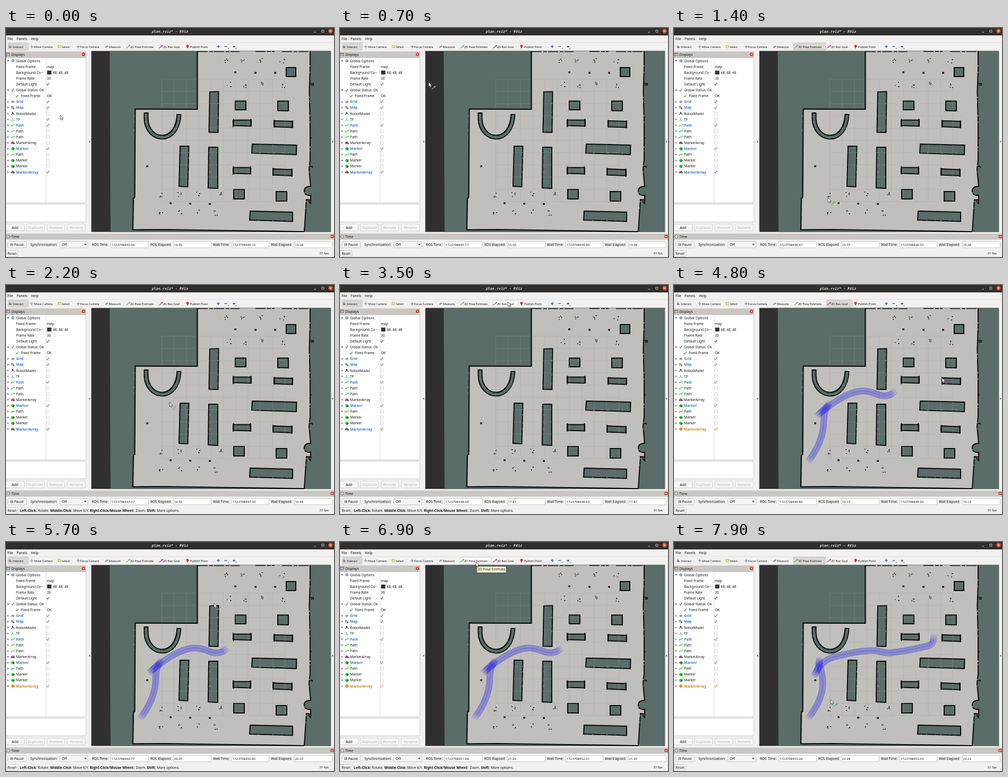
Write an HTML page that moves like this. It is 618 px wide and 434 px high and loops after 8 s.

```html
<!DOCTYPE html>
<html lang="en">
<head>
<meta charset="utf-8">
<title>plan.rviz* - RViz</title>
<style>
html, body { margin: 0; width: 100%; height: 100%; overflow: hidden; background: #f2f1f0; }
svg { display: block; width: 618px; height: 434px; font: 6.5px "Noto Sans", "Open Sans", sans-serif; fill: #141414; }
text { white-space: pre; }
.bar { font-size: 5.4px; }
.num { font-size: 6.15px; }
.b { font-weight: 700; }
.on { font-weight: 700; fill: #3d78c6; }
.warn { font-weight: 700; fill: #c98522; }
.off { fill: #bbb8b5; }
.wall { fill: none; stroke: #080808; stroke-width: 2.2; }
.box { fill: #5a6d68; stroke: #080808; stroke-width: 2; }
.foot path { fill: #2020f0; fill-opacity: .075; stroke: #1818d8; stroke-opacity: .15; stroke-width: .5; }
</style>
</head>
<body>
<svg id="stage" viewBox="0 0 618 434"></svg>
<script>
const stage = document.getElementById('stage');
const LOOP = 8000, STEP = 100;
const TEAL = '#5a6d68', FREE = '#c1bfbc', HEADER = '#c9c6c3';

const rect = (x, y, w, h, fill, extra = '') =>
  `<rect x="${x}" y="${y}" width="${w}" height="${h}" fill="${fill}" ${extra}/>`;
const text = (x, y, s, extra = '') => `<text x="${x}" y="${y}" ${extra}>${s}</text>`;
const line = (d, color, w = 1, extra = '') =>
  `<path d="${d}" fill="none" stroke="${color}" stroke-width="${w}" ${extra}/>`;
const shape = (d, fill, extra = '') => `<path d="${d}" fill="${fill}" ${extra}/>`;
const disc = (x, y, r, fill) => `<circle cx="${x}" cy="${y}" r="${r}" fill="${fill}"/>`;
const frame = (x, y, w, h, fill = '#fff', edge = '#c3bfbb') =>
  rect(x + .5, y + .5, w - 1, h - 1, fill, `rx="1.5" stroke="${edge}" stroke-width=".8"`);
const tick = (x, y, color = '#333', s = 1) =>
  line(`M${x - 2 * s} ${y}l${1.5 * s} ${1.8 * s}l${2.7 * s} ${-4 * s}`, color, s);

let seed = 11;
const rnd = () => (seed = seed * 16807 % 2147483647) / 2147483647;

function closeIcon(x, y) {
  return rect(x - 3, y - 3, 6, 6, '#d33a35', 'rx="1.5"') +
    line(`M${x - 1.3} ${y - 1.3}l2.6 2.6m0-2.6l-2.6 2.6`, '#fff', .9);
}

function titleAndMenu() {
  return rect(0, 0, 618, 14, '#302f2d') +
    text(309, 8.6, 'plan.rviz* - RViz', `text-anchor="middle" fill="#e4e0d8"
      style="font:italic bold 6.7px 'DejaVu Sans Mono',monospace"`) +
    line('M580 8h4M595 4h4v4h-4z', '#d6d2ca', .9) + disc(611.5, 5.8, 4.2, '#e3562b') +
    line('M610 4.3l3 3m0-3l-3 3', '#fff', .9) +
    text(3, 23, 'File') + text(20, 23, 'Panels') + text(47, 23, 'Help') +
    line('M0 27.5H618', '#dedbd8', .7);
}

const arrowIcon = (x, y, color) =>
  line(`M${x - 3.5} ${y + 2.8}l5-4`, color, 1.1) + shape(`M${x + 4} ${y - 3.3}l-1.2 3.4-2.3-2.6z`, color);

function toolbar() {
  const tools = [[13, 'Interact'], [53, 'Move Camera'], [105, 'Select'], [140, 'Focus Camera'],
    [194, 'Measure'], [234, '2D Pose Estimate'], [296, '2D Nav Goal'], [347, 'Publish Point']];
  return tools.map(([x, s]) => text(x, 37.7, s, 'class="bar"')).join('') +
    shape('M6 38l-1-3 1-.4.7 1V32h1.2v2.5l2.5.6v2.9z', '#7d8794') +
    line('M48.5 32v7M45 35.5h7', '#8b949c', 1.2) +
    rect(98, 33, 5, 4.5, '#f1e7a6', 'stroke="#b9a84c" stroke-width=".8"') +
    line('M136 32v7M132.5 35.5h7', '#8b949c', 1) + disc(136, 35.5, 1.4, '#8b949c') +
    line('M187 37l5-3', '#8c9099', 2.4) +
    arrowIcon(230, 35.5, '#35c93f') + arrowIcon(292, 35.5, '#b822a8') +
    shape('M342 39.3l-2.3-4a2.5 2.5 0 1 1 4.6 0z', '#cf3b2e') +
    line('M400 32.5v5.5M397.2 35.2h5.6M411.5 35.2h5', '#3f7ecb', 1.7) +
    shape('M417.5 38.5h3l-1.5 1.5zM432 38.5h3l-1.5 1.5z', '#555') +
    shape('M426.5 35.2q3.2-3.5 6.5 0q-3.3 3.2-6.5 0z', '#8d9bb0') + disc(429.7, 35.2, 1.3, '#2e4b78');
}

// icon, label, value ('1'/'0' = checkbox), optional id
const rows = [
  ['gear', 'Global Options'], ['', 'Fixed Frame', 'map'], ['', 'Background Co···', '48; 48; 48'],
  ['', 'Frame Rate', '30'], ['', 'Default Light', '1'], ['ok', 'Global Status: Ok'],
  ['sub', 'Fixed Frame', 'OK'], ['grid', 'Grid', '1'], ['map', 'Map', '1'], ['robot', 'RobotModel', '0'],
  ['tf', 'TF', '1', 'tf'], ['path', 'Path', '1'], ['path', 'Path', '0'], ['path', 'Path', '0'],
  ['array', 'MarkerArray', '0'], ['cube', 'Marker', '1'], ['path', 'Path', '0'],
  ['cube', 'Marker', '0'], ['cube', 'Marker', '0'], ['array', 'MarkerArray', '1', 'arr']
];
const rowY = i => 62.2 + i * 11.1;

const icons = {
  gear: y => disc(13, y, 2.7, '#5b8fc7') + disc(13, y, 1, '#dfeaf5'),
  ok: y => tick(12.5, y, '#2e9a35', 1.15),
  sub: y => tick(21, y, '#2e9a35', 1.15),
  grid: y => shape(`M9.5 ${y}l3.5-2.5 3.5 2.5-3.5 2.5z`, '#8f9396'),
  map: y => rect(10, y - 2.7, 5.5, 5.4, '#c9ccca') + shape(`M10 ${y - 2.7}h2.5v2.7h-2.5zM13 ${y}h2.500v2.700h-2.500z`, '#6f7673'),
  robot: y => disc(12.5, y - 1.5, 1.5, '#444') + line(`M10 ${y + 2.5}l2-2.5h2l2 2.5`, '#555', 1.2),
  tf: y => line(`M12.5 ${y + 1}v-4m0 4l-3 1.5`, '#3c9d55', .9) + line(`M12.5 ${y + 1}l3.5 1.5`, '#5689c4', .9),
  path: y => line(`M9.5 ${y + 2.3}c2-5 4 0 7-4.3`, '#2fd43a', 1.4),
  cube: y => shape(`M13 ${y - 3}l3 1.5v3l-3 1.7-3-1.7v-3z`, '#25c52c') + shape(`M13 ${y}l3-1.5v3l-3 1.7z`, '#12801a'),
  array: y => disc(13, y - 1.2, 1.7, '#2ca53a') + disc(11.2, y + .5, 1.9, '#cc3a30') + disc(14.7, y + .8, 1.9, '#3a62c9')
};

function tree() {
  let out = '';
  rows.forEach(([icon, label, value, id], i) => {
    const y = rowY(i), open = i === 0 || i === 5, check = value === '1' || value === '0';
    if (open) out += shape(`M2 ${y - 1}h4l-2 2.5z`, '#444');
    else if (i > 6) out += shape(`M2.8 ${y - 2}v4l2.5-2z`, '#666');
    if (icon) out += `<g ${id ? `id="${id}Icon"` : ''}>${icons[icon](y)}</g>`;
    const cls = i > 6 && value === '1' ? 'class="on"' : '';
    out += text(icon === 'sub' ? 28 : 19, y + 2.4, label, cls + (id ? ` id="${id}Label"` : ''));
    if (check) {
      out += frame(76, y - 3.2, 6.4, 6.4, '#fff', '#cbc8c5');
      if (value === '1') out += `<g ${id ? `id="${id}Tick"` : ''}>${tick(78.8, y, i > 6 ? '#3b628b' : '#222')}</g>`;
    } else if (value) {
      const swatch = value.includes(';');
      if (swatch) out += rect(77.5, y - 3.7, 8, 7.4, '#303030');
      out += text(swatch ? 88 : 77, y + 2.4, value);
    }
  });
  return out;
}

function displays() {
  const button = (x, w, s, cls = '') =>
    frame(x, 371, w, 14, '#f6f5f4', '#cfccc9') + text(x + w / 2, 380.6, s, `text-anchor="middle" ${cls}`);
  return rect(0, 44.5, 151, 11.5, HEADER) + line('M1 47.5h6v5h-6zM1 49h6', '#666', .8) +
    text(10, 52.5, 'Displays') + closeIcon(146, 50) +
    frame(-1, 56, 152, 276) + line('M75.5 57V331', '#dddbd9', .8) + tree() +
    frame(-1, 333.5, 152, 34.5) +
    button(-1, 36, 'Add') + button(38, 35, 'Duplicate', 'class="off"') +
    button(77, 34, 'Remove', 'class="off"') + button(115, 35, 'Rename', 'class="off"');
}

const cluster = (x, y) => {
  let d = '';
  for (let i = 0; i < 4; i++) d += `M${x + rnd() * 9 - 4} ${y + rnd() * 10 - 5}h${1 + rnd() * 1.2}v1.7h-1.5z`;
  return shape(d, '#111');
};

function map() {
  const shelves = ['384 121L400.5 120.5L399.5 198L382.5 197.5', '432 138.5L452 138.5L452 155L432 155',
    '512 138.5L532 138.5L532 157L512 156.5', '428 174.5L462 174.5L462 186L428 185',
    '505 176L540 177L540 188.5L505 187', '464 220L547.5 222L547 240L463 237',
    '328 224L344.5 224L342.5 301L326 300', '382 226L399 226L399 304L381 303',
    '428 264.5L461 264.5L461 276.5L428 275.5', '503 267L539 268.5L539 280L503 278.5',
    '429 306L449 306L449 324L429 324', '509 310L529 310L529 328L509 328',
    '460 347L540 349L540 366.5L459 364', '528 75L546 75L546 92L528 92'];
  const rim = 'M360.5 44V154L243.5 153.5L242.5 321L240 323L239 382.5L300 382L430 384L561 386';
  const right = 'M573 44V78L571.5 120L573 180V250L571 268L574 300C565 300 562 304 562 309C562 316 568 318 574 317V326L566 325L562 386';
  const floor = rim + 'L562 386L566 325L574 326V317C568 318 562 316 562 309C562 304 565 300 574 300L571 268L573 250V180L571.5 120L573 78V44Z';
  const cup = 'C265.5 217 323.5 223 326';
  let grid = '';
  for (let i = 0; i <= 10; i++) {
    const k = i * 23.2;
    grid += `M${293.5 + k} 97V329M293.5 ${97 + k}H525.5`;
  }
  let out = rect(160.7, 43.5, 451.5, 343, '#303030') + shape('M195.5 43.5H612.2V386.5H197z', TEAL) +
    shape(floor, FREE) +
    shelves.map(p => `<path class="box" d="M${p}Z"/>`).join('') +
    line(`M264 160V172${cup} 163`, '#080808', 9) +
    line(`M264 162V172${cup} 165`, TEAL, 5) +
    line(grid, '#a0a0a4', .7, 'opacity=".42"');
  // thick shelf ends
  out += line('M428.5 172v16M461.5 172v15M505.5 174v15M539.5 175v15M428.5 262v16M460.5 262v16M503.5 265v15M538.5 266v16', '#080808', 1.8);
  out += `<path class="wall" d="${rim}"/>` +
    line(right, '#080808', 2, 'stroke-dasharray="27 1.5 11 1 46 2 5 1"') +
    line('M361 44.8H440M470 44.5H506M520 44.8H573', '#111', 1.3, 'stroke-dasharray="19 3 7 2"') +
    line('M572 105h7v3h-5M573 208h3M573 262h4v3M570 328l4 5v-10', '#080808', 1.5) +
    line('M241.5 205L242 160M399 132V192M384 235V298M467 237H543M465 365H530M344 235V296M262 167l1 12', '#e2e1df', .7, 'stroke-dasharray="1 9 2 15"');
  for (const [y, xs] of [[61, [416, 445, 481, 519]], [107, [418, 447, 484, 519]],
    [315, [292, 325, 363, 404]], [349, [291, 326, 360, 393]]])
    out += xs.map(x => cluster(x, y)).join('');
  for (const [x, y] of [[432, 84], [470, 85], [507, 85], [310, 332], [347, 333], [384, 333.5], [266, 262]])
    out += rect(x - 1.7, y - 1.6, 3.6, 3.2, '#080808');
  return out;
}

function timePanel() {
  const fields = [[162, 197, 72, 'ROS Time:'], [272, 315, 72, 'ROS Elapsed:'],
    [390, 425, 71, 'Wall Time:'], [499, 543, 72, 'Wall Elapsed:']];
  return rect(0, 389.5, 618, 11.5, HEADER) +
    '<circle cx="4.5" cy="395.3" r="2.7" fill="#fff" stroke="#555" stroke-width=".9"/>' +
    text(10, 397.8, 'Time') + closeIcon(614.5, 395) +
    frame(3, 404, 36, 13, '#f6f5f4') + line('M9.5 408v5M12.5 408v5', '#444', 1.3) + text(15.2, 412.8, 'Pause') +
    text(46, 412.8, 'Synchronization:') + frame(101, 404, 54, 13, '#f6f5f4') + text(105, 412.8, 'Off') +
    shape('M147 409h5l-2.5 3z', '#555') +
    fields.map(([x, fx, w, s], i) => text(x, 412.8, s) + frame(fx, 404, w, 13) +
      text(fx + 1.6, 412.7, '', `id="clock${i}" class="num"`)).join('') +
    frame(0, 421, 23, 13, '#f6f5f4') + text(3, 430, 'Reset') + text(590.5, 428.6, '31 fps', 'class="num"') +
    `<text id="hint" x="26" y="429.8"><tspan class="b">Left-Click:</tspan> Rotate. <tspan class="b">Middle-Click:</tspan> Move X/Y. <tspan class="b">Right-Click/Mouse Wheel:</tspan>: Zoom. <tspan class="b">Shift:</tspan> More options.</text>`;
}

// footprints swept along a route with one reversal
function footprints(d) {
  const p = document.createElementNS('http://www.w3.org/2000/svg', 'path');
  p.setAttribute('d', d);
  const len = p.getTotalLength();
  let out = '';
  for (let s = 0; s <= len; s += 3) {
    const c = p.getPointAtLength(s);
    const a = p.getPointAtLength(Math.max(0, s - .5)), b = p.getPointAtLength(Math.min(len, s + .5));
    const deg = Math.atan2(b.y - a.y, b.x - a.x) * 180 / Math.PI;
    out += `<path d="M-6-5.7h12v11.4h-12zM-6 0h12" transform="translate(${c.x} ${c.y}) rotate(${deg})"/>`;
  }
  return out;
}
const routes = [
  'M256 330C272 308 281 285 282 262S284 240 291 227L273 245C300 222 330 201 357 201C376 202 384 210 396 210C404 210 409 207 415 203',
  'M256 330C272 308 282 285 280 262S274 240 274 225Q272 240 266 250C275 233 285 222 305 217C330 211 355 205 378 206C395 208 400 212 415 209C440 206 465 200 478 197C486 195 489 190 489 180'
];

stage.innerHTML = rect(0, 0, 618, 434, '#f2f1f0') + titleAndMenu() +
  `<g id="hover">${frame(0, 28.5, 61, 13.5, '#fbfbfa', '#c9c6c3')}</g>` +
  '<rect id="active" y="28.5" height="13.5" rx="1.5" fill="#d9d7d4" stroke="#bdbab6" stroke-width=".7"/>' +
  toolbar() + displays() + map() +
  routes.map((d, i) => `<g id="route${i}" class="foot">${footprints(d)}</g>`).join('') +
  shape('M158.3 213.5v4l-2.2-2zM614.5 213.5v4l2.2-2z', '#555') + timePanel() +
  `<g id="tip">${rect(257.5, 46, 56, 12.3, '#ffffdc', 'stroke="#222" stroke-width=".8"')}${text(259, 54.3, '2D Pose Estimate')}</g>` +
  `<g id="cursor"><g id="toolMark">${line('M6 13l5-4', 'currentColor', 1.2)}${shape('M13.5 6.5l-1.5 4-2.5-2.8z', 'currentColor')}</g>
   ${shape('M0 0V8.5L2 6.7 3.4 9.7 4.9 9 3.5 6.2H6.2Z', '#fff', 'stroke="#222" stroke-width=".7"')}</g>`;

const el = id => document.getElementById(id);
const show = (id, on) => { el(id).style.display = on ? '' : 'none'; };

const trail = [[0, 102, 165], [300, 78, 171], [500, 78, 171], [900, 256, 35], [1000, 256, 35],
  [1400, 290, 322], [1650, 256, 331], [1900, 262, 318], [2200, 308, 222], [3300, 312, 37],
  [3500, 316, 32], [3700, 316, 32], [4800, 505, 176], [5100, 488, 181], [5300, 489, 172],
  [6200, 256, 38], [7300, 256, 38], [7900, 295, 299]];
const clockTimes = [0, 1400, 2200, 3500, 4800, 6900, 7900];
const clocks = [
  [45.06, 46.47, 47.27, 48.58, 49.86, 51.98, 53.00], [14.35, 15.75, 16.56, 17.87, 19.15, 21.26, 22.28],
  [45.10, 46.50, 47.30, 48.62, 49.90, 52.01, 53.03], [14.28, 15.69, 16.46, 17.87, 19.15, 21.20, 22.22]
];
const modes = [[0, 'interact'], [1000, 'pose'], [1900, 'interact'], [3700, 'goal'], [5300, 'interact'], [7300, 'pose']];
const spans = { interact: [4, 38], pose: [225, 61], goal: [287.5, 48.5] };
const marks = { interact: '#a3a3a1', pose: '#2fc43a', goal: '#c01fae' };

function segment(times, t) {
  let i = 0;
  while (i < times.length - 2 && times[i + 1] <= t) i++;
  return [i, Math.min(1, (t - times[i]) / (times[i + 1] - times[i]))];
}
const trailTimes = trail.map(k => k[0]);
const within = (t, a, b) => t >= a && t < b;

function draw(t) {
  const [i, raw] = segment(trailTimes, t), u = raw * raw * (3 - 2 * raw);
  const x = trail[i][1] + (trail[i + 1][1] - trail[i][1]) * u;
  const y = trail[i][2] + (trail[i + 1][2] - trail[i][2]) * u;
  el('cursor').setAttribute('transform', `translate(${x} ${y})`);

  const mode = modes.filter(m => m[0] <= t).pop()[1];
  el('active').setAttribute('x', spans[mode][0]);
  el('active').setAttribute('width', spans[mode][1]);
  show('toolMark', x > 161 && y > 43);
  el('toolMark').style.color = marks[mode];

  const inBar = y > 28 && y < 42;
  const over = inBar && ['pose', 'goal'].find(k => within(x, spans[k][0], spans[k][0] + spans[k][1]));
  show('hover', over && over !== mode);
  if (over) {
    el('hover').setAttribute('transform', `translate(${spans[over][0]})`);
    el('hover').firstChild.setAttribute('width', spans[over][1] - 1);
  }

  const [c, v] = segment(clockTimes, t);
  clocks.forEach((k, n) => {
    const s = (k[c] + (k[c + 1] - k[c]) * v).toFixed(2);
    el('clock' + n).textContent = n % 2 ? s : '17237984' + s;
  });

  const tf = t < 400, warn = t >= 4200, arrY = rowY(19);
  show('tfTick', tf);
  el('tfLabel').setAttribute('class', tf ? 'on' : '');
  el('arrLabel').setAttribute('class', warn ? 'warn' : 'on');
  el('arrTick').firstChild.setAttribute('stroke', warn ? '#c98522' : '#3b628b');
  el('arrIcon').innerHTML = warn ? disc(13, arrY, 3, '#e8892a') : icons.array(arrY);
  show('route0', within(t, 4200, 7500));
  show('route1', t >= 7500);
  show('hint', within(t, 1900, 3700) || within(t, 5500, 7300));
  show('tip', within(t, 6700, 7300));
}

const start = performance.now();
function tickFrame() {
  const t = (performance.now() - start) % LOOP;
  draw(Math.floor(t / STEP) * STEP);
  requestAnimationFrame(tickFrame);
}
tickFrame();
</script>
</body>
</html>
```
